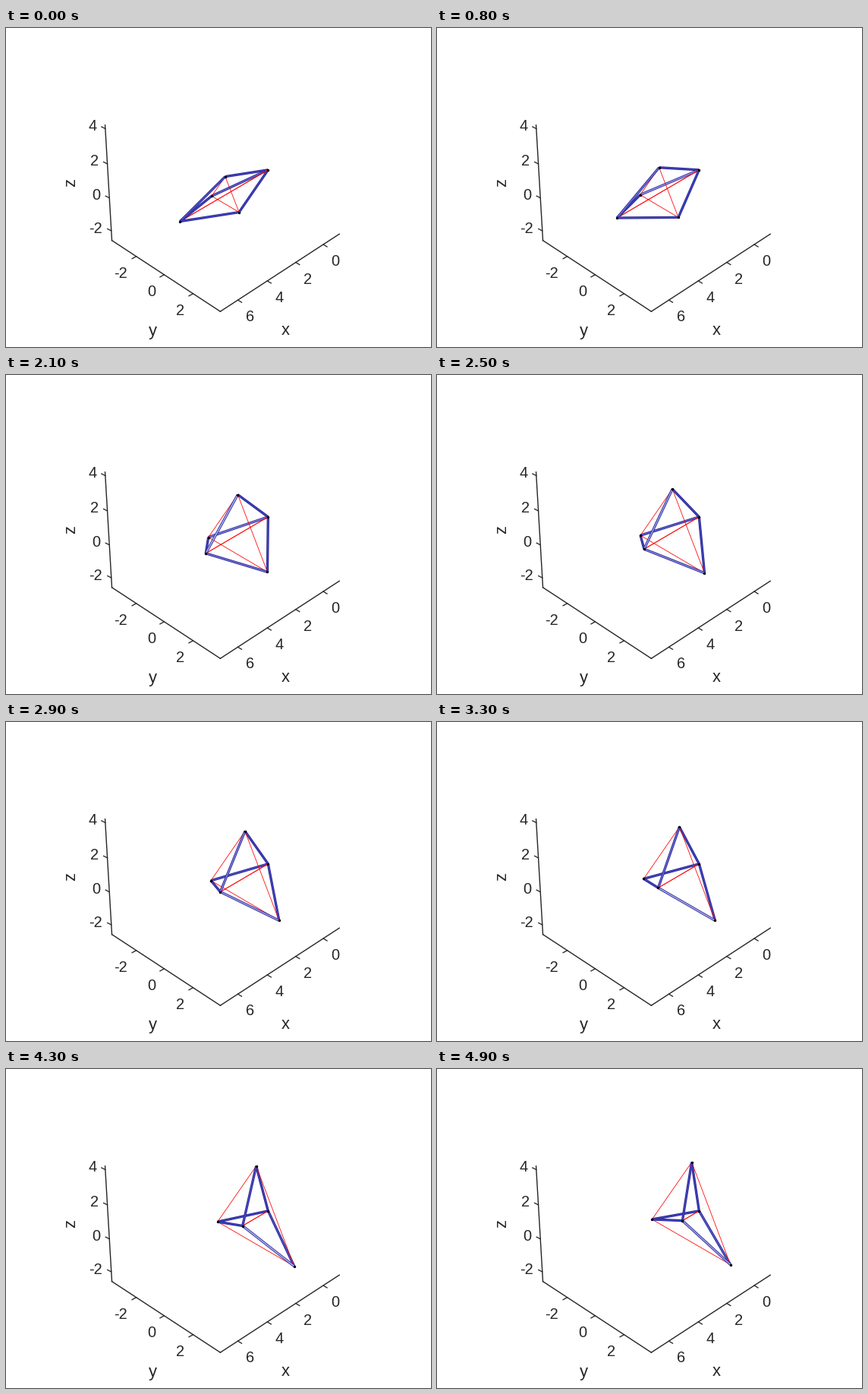
A matplotlib script for the animation above (5000 ms loop, 560 px wide and 420 px high).

```python
import numpy as np
import matplotlib.pyplot as plt
from matplotlib.animation import FuncAnimation

W, H, DPI = 560, 420, 100
FRAMES, INTERVAL = 50, 100
INK = (0.15, 0.15, 0.15)
EDGE = np.array([42, 42, 145]) / 255
CORE = np.array([62, 62, 188]) / 255
SHINE = np.array([170, 170, 242]) / 255

# Perspective camera looking along (-1, -1, -1) at the middle of the axes box
TARGET = np.array([3.0, 0.05, 0.8])
RIGHT = np.array([-1, 1, 0]) / np.sqrt(2)
UP = np.array([-1, -1, 2]) / np.sqrt(6)
VIEW = np.array([1, 1, 1]) / np.sqrt(3)
DISTANCE, SCALE = 68, 27.3
CENTER = np.array([289.7, 202])

X_LIM, Y_LIM, Z_LIM = (-1.2, 7.16), (-3.8, 3.82), (-2.6, 4.2)
BAR_LENGTH = 3.21


def project(point):
    p = np.asarray(point) - TARGET
    scale = SCALE * DISTANCE / (DISTANCE - p @ VIEW)
    return CENTER + scale * np.array([p @ RIGHT, -(p @ UP)])


def px(size):
    return size * 72 / DPI


fig = plt.figure(figsize=(W / DPI, H / DPI), dpi=DPI, facecolor="white")
ax = fig.add_axes([0, 0, 1, 1])
ax.set_xlim(-0.5, W - 0.5)
ax.set_ylim(H - 0.5, -0.5)
ax.axis("off")


def label(x, baseline, text, size=20, ha="center", **kw):
    ax.text(x, baseline, text, family="Liberation Sans", size=px(size),
            color=INK, ha=ha, va="baseline", **kw)


def draw_axis(place, limits, ticks, tick, offset, ha):
    """Draw one axis; place() turns a value on it into a 3D point."""
    ax.plot(*np.transpose([project(place(v)) for v in limits]), color=INK, lw=px(1.4))
    for value in ticks:
        start = project(place(value))
        ax.plot(*np.transpose([start, start + tick]), color=INK, lw=px(1.3))
        label(*(start + offset), str(value), ha=ha)


draw_axis(lambda v: (v, Y_LIM[1], Z_LIM[0]), X_LIM, range(0, 7, 2),
          (5, 3), (10, 28), "left")
draw_axis(lambda v: (X_LIM[1], v, Z_LIM[0]), Y_LIM, range(-2, 3, 2),
          (-5.5, 3), (-11.5, 28), "right")
draw_axis(lambda v: (X_LIM[1], Y_LIM[0], v), Z_LIM, range(-2, 5, 2),
          (-5, -2.5), (-11.5, 2.5), "right")
label(367.5, 404, "x", 22)
label(192.5, 405, "y", 22)
label(90.5, 203, "z", 22, rotation=90, rotation_mode="anchor")


def node_positions(t):
    """Bipyramid with rigid bars: the tip slides in while the middle ring opens."""
    opening = np.radians(np.polyval([0.131, -1.586, 5.67, 7.01, 19.9], t))
    half, radius = BAR_LENGTH * np.cos(opening), BAR_LENGTH * np.sin(opening)
    nodes = {"A": np.zeros(3), "D": np.array([2 * half, 0, 0])}
    for name, degrees in zip("BCE", (90, 210, 330)):
        a = np.radians(degrees)
        nodes[name] = np.array([half, radius * np.cos(a), radius * np.sin(a)])
    return nodes


def gloss(direction):
    """Bars at right angles to the line of sight catch the light."""
    facing = direction @ VIEW / np.linalg.norm(direction)
    return np.exp(-(facing / 0.25) ** 2)


def segment(width, color, z):
    return ax.plot([], [], color=color, lw=px(width), zorder=z,
                   solid_capstyle="butt")[0]


# Bars to A lie behind the ring, bars to D in front of it
bars = {}
for tip, base in (("A", 10), ("D", 30)):
    for i, ring in enumerate("CBE"):
        z = base + i
        bars[ring + tip] = segment(3.3, EDGE, z), segment(1.7, CORE, z + 0.5)
cables = {name: segment(1.2 if name == "AD" else 0.8, "red", 20)
          for name in ("BC", "CE", "BE", "AD")}
dots = ax.plot([], [], "o", color="black", ms=px(3.4), mew=0, zorder=50)[0]


def update(frame):
    nodes = node_positions(frame * INTERVAL / 1000)
    screen = {name: project(p) for name, p in nodes.items()}

    def ends(name):
        return np.transpose([screen[n] for n in name])

    for name, (edge, core) in bars.items():
        edge.set_data(*ends(name))
        core.set_data(*ends(name))
        light = gloss(nodes[name[1]] - nodes[name[0]])
        core.set_color(CORE + (SHINE - CORE) * light)
    for name, line in cables.items():
        line.set_data(*ends(name))
    dots.set_data(*ends("ABCDE"))
    return [dots, *cables.values(), *(part for bar in bars.values() for part in bar)]


anim = FuncAnimation(fig, update, frames=FRAMES, interval=INTERVAL,
                     repeat=True, repeat_delay=0, blit=False)
plt.show()
```
